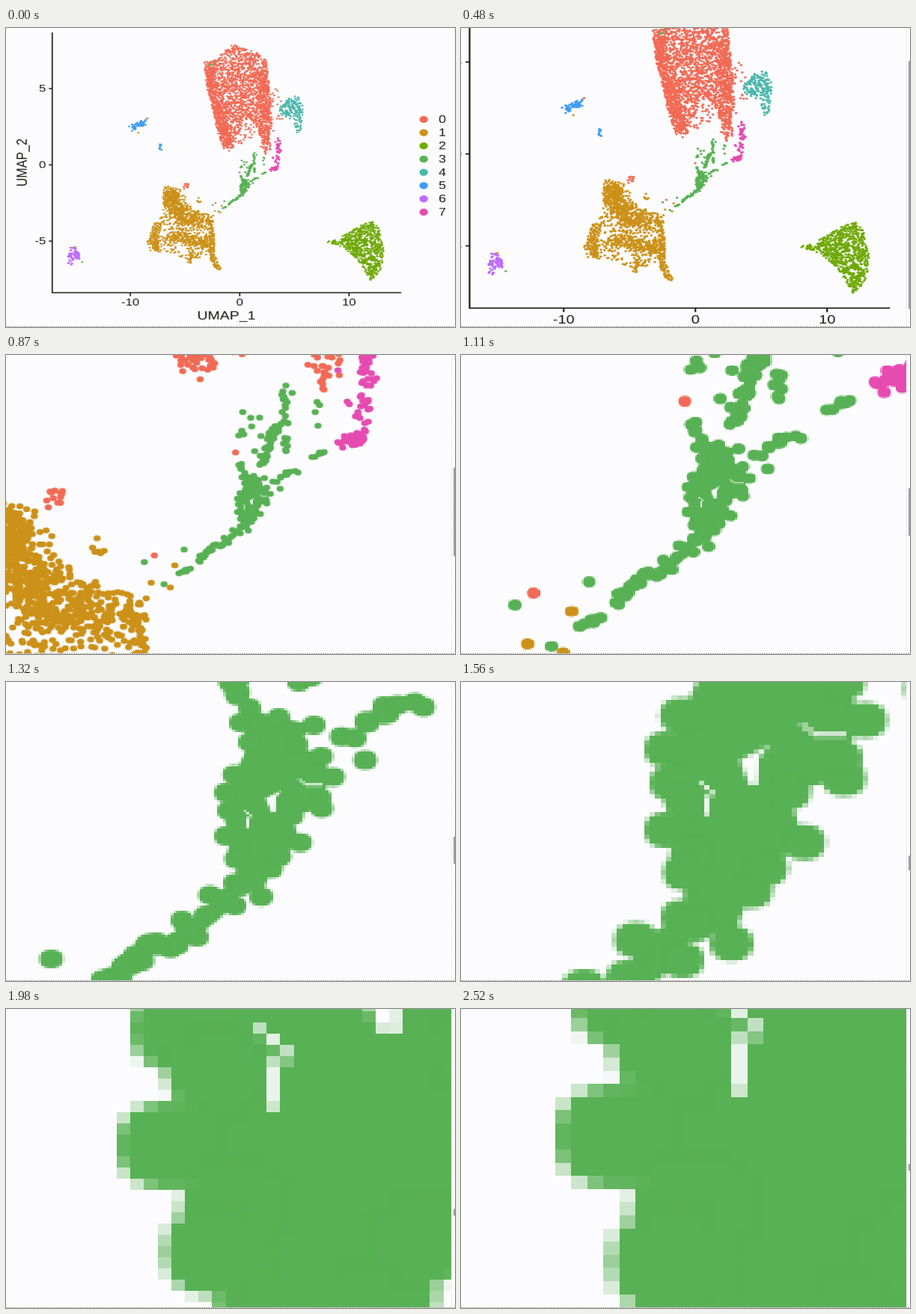
These frames come from a looping animation (600x400 px, 2.76 s). An HTML page with a canvas:

```html
<!DOCTYPE html>
<html lang="en">
<head>
<meta charset="utf-8">
<title>Cluster zoom</title>
<style>
  html, body { margin: 0; width: 100%; height: 100%; overflow: hidden; background: #fcfcfe; }
  canvas { display: block; width: 600px; height: 400px; }
</style>
</head>
<body>
<canvas id="stage" width="600" height="400"></canvas>
<script>
// The plot is a bitmap with slightly wide pixels, shown on a 600 x 400 stage.
const PLOT = { w: 1695, h: 1373 };
const KX = PLOT.w / 600, KY = PLOT.h / 400;
const ANCHOR = { x: 884, y: 744 };
const BACK = '#fcfcfe', INK = '#16160c', FONT = '"Liberation Sans", Arial, sans-serif';
const COLORS = ['#f26a55', '#cc9118', '#6fa908', '#58b154', '#4ab7ac', '#3f9cf2', '#bd6bfc', '#e64bb0'];
const [RED, GOLD, OLIVE, GREEN, TEAL, BLUE, PURPLE, PINK] = COLORS;

const plot = document.createElement('canvas');
plot.width = PLOT.w;
plot.height = PLOT.h;
const pen = plot.getContext('2d');

let seed = 20;
function random() {
  seed = (seed * 1664525 + 1013904223) % 4294967296;
  return seed / 4294967296;
}

const mix = (a, b, k) => a + (b - a) * k;
const clamp = (v, lo, hi) => Math.max(lo, Math.min(hi, v));

function disc(x, y, r, color) {
  pen.fillStyle = color;
  pen.beginPath();
  pen.arc(x, y, r, 0, 7);
  pen.fill();
}

// Two ways to place a dot: in stage units, or in bitmap pixels from the anchor.
const onStage = (color, x, y) => disc(x * KX, y * KY, 4, color);
const nearAnchor = (color, x, y) => disc(ANCHOR.x + x, ANCHOR.y + y, 4, color);

function outline(points, origin = { x: 0, y: 0 }) {
  const path = new Path2D();
  points.forEach(([x, y]) => path.lineTo(origin.x + x, origin.y + y));
  return path;
}

// Random dots inside a polygon.
function fillArea(color, count, points) {
  const path = outline(points);
  const xs = points.map(p => p[0]), ys = points.map(p => p[1]);
  const x0 = Math.min(...xs), x1 = Math.max(...xs);
  const y0 = Math.min(...ys), y1 = Math.max(...ys);
  while (count > 0) {
    const x = mix(x0, x1, random()), y = mix(y0, y1, random());
    if (!pen.isPointInPath(path, x, y)) continue;
    onStage(color, x, y);
    count--;
  }
}

// Random dots strewn along a line, up to `spread` away from it.
function strew(place, color, count, spread, points) {
  for (let i = 0; i < count; i++) {
    const t = (i + random()) / count * (points.length - 1);
    const k = Math.min(Math.floor(t), points.length - 2);
    const [a, b] = [points[k], points[k + 1]];
    const turn = random() * 2 * Math.PI, off = spread * Math.sqrt(random());
    place(color, mix(a[0], b[0], t - k) + off * Math.cos(turn),
      mix(a[1], b[1], t - k) + off * Math.sin(turn));
  }
}

function label(text, x, y, size, align, turn = 0) {
  pen.save();
  pen.translate(x * KX, y * KY);
  pen.rotate(turn);
  pen.font = size + 'px ' + FONT;
  pen.textAlign = align;
  pen.textBaseline = 'middle';
  pen.fillStyle = INK;
  pen.fillText(text, 0, 0);
  pen.restore();
}

function rule(x1, y1, x2, y2) {
  pen.strokeStyle = INK;
  pen.lineWidth = 5;
  pen.beginPath();
  pen.moveTo(x1 * KX, y1 * KY);
  pen.lineTo(x2 * KX, y2 * KY);
  pen.stroke();
}

function drawAxes() {
  rule(62, 6, 62, 354.6);
  rule(61.5, 354, 528, 354);
  [-10, 0, 10].forEach(v => {
    const x = 312.3 + v * 14.6;
    rule(x, 354, x, 358.5);
    label(v, x, 367.5, 47, 'center');
  });
  [5, 0, -5].forEach(v => {
    const y = 183 - v * 20.4;
    rule(57.5, y, 62, y);
    label(v, 53.5, y + 0.6, 47, 'right');
  });
  label('UMAP_1', 294.5, 385.5, 55, 'center');
  label('UMAP_2', 22.5, 180, 55, 'center', -Math.PI / 2);
  COLORS.forEach((color, i) => {
    const y = 122.3 + i * 17.7;
    disc(558 * KX, y * KY, 16, color);
    label(i, 578, y + 0.6, 50, 'left');
  });
}

function drawClusters() {
  const along = (...args) => strew(onStage, ...args);

  fillArea(RED, 1950, [[265, 46], [280, 42], [302, 22], [335, 33], [348, 43], [353, 95], [356, 130],
    [347, 170], [334, 130], [318, 120], [301, 162], [282, 135], [268, 75]]);
  along(RED, 320, 8, [[282, 100], [289, 132], [297, 158]]);
  along(RED, 200, 7, [[345, 60], [346, 110], [347, 160]]);
  along(RED, 150, 6, [[271, 53], [277, 95]]);
  along(RED, 45, 14, [[304, 145], [328, 132]]);
  along(RED, 30, 10, [[357, 85], [362, 118]]);
  along(RED, 14, 5, [[239, 209], [242, 213]]);

  fillArea(GOLD, 520, [[211, 212], [232, 213], [248, 241], [277, 250], [278, 300], [246, 312],
    [220, 302], [190, 297], [188, 284], [207, 258]]);
  along(GOLD, 500, 11, [[220, 219], [222, 235], [236, 251], [266, 259]]);
  along(GOLD, 120, 6, [[204, 259], [195, 283], [203, 294]]);
  along(GOLD, 200, 8, [[218, 281], [236, 279], [256, 287], [272, 286]]);
  along(GOLD, 160, 4, [[273, 254], [275, 284], [275, 305], [284, 322]]);
  along(GOLD, 24, 3, [[249, 298], [246, 313]]);
  along(GOLD, 6, 3, [[255, 228], [260, 235]]);

  fillArea(OLIVE, 780, [[428, 286], [445, 281], [475, 263], [490, 259], [498, 268], [506, 300],
    [500, 325], [488, 339], [470, 310], [450, 293]]);
  fillArea(TEAL, 175, [[364, 108], [378, 91], [390, 91], [397, 105], [394, 138], [386, 141],
    [385, 124], [368, 116]]);
  along(PINK, 80, 3, [[364, 148], [365, 165], [361, 187], [355, 190]]);
  along(PINK, 6, 8, [[356, 140], [356, 175]]);
  along(BLUE, 50, 4, [[167, 134], [177, 129], [187, 126]]);
  along(BLUE, 8, 2.5, [[205, 156], [206, 162]]);
  fillArea(PURPLE, 75, [[83, 293], [92, 293], [100, 303], [99, 309], [91, 309], [90, 317], [83, 316]]);

  onStage(RED, 189, 121);
  onStage(GOLD, 177, 140);
  onStage(GOLD, 93, 293);
  onStage(GREEN, 102, 313);
  along(GREEN, 3, 3, [[272, 48], [277, 47]]);
}

function drawBridge() {
  const along = (...args) => strew(nearAnchor, GREEN, ...args);

  // The crowded middle: a filled ring with one dot on each corner.
  const ring = [[8, -53], [5, -47], [8, -39], [2.8, -25.5], [0, -18], [1, -10.5], [3.6, -6.5], [0, 0],
    [4.7, 5.5], [3.4, 9.5], [3, 19.5], [-5.5, 24.5], [-7, 33], [-15, 35], [-10, 42], [3, 29], [5, 21],
    [12, 25.3], [15.5, 13.5], [18.4, 8.5], [25.3, 2.8], [22.5, -8.5], [32.6, -11.5], [32, -16],
    [36.5, -24.5], [32.5, -33], [24, -38], [30, -46], [18, -49]];
  pen.fillStyle = GREEN;
  pen.fill(outline(ring, ANCHOR));
  ring.forEach(([x, y]) => nearAnchor(GREEN, x, y));

  // Gaps between the crowded dots.
  pen.fillStyle = pen.strokeStyle = BACK;
  pen.fill(outline([[13.5, -15.5], [19, -19], [17, -16], [16.8, -10], [15.4, -10]], ANCHOR));
  pen.lineWidth = 0.9;
  pen.stroke(outline([[6.3, -10.7], [8.4, -8.5], [7.5, -7], [7.5, -3.2]], ANCHOR));
  pen.stroke(outline([[25, -23.7], [27, -21.3], [33, -21.3]], ANCHOR));

  along(5, 2, [[3, -66], [4, -56]]);
  along(50, 5, [[24, -63], [33, -86], [38, -106], [54, -125], [54, -170]]);
  along(7, 4, [[52, -80], [56, -102]]);
  along(10, 4, [[40, -39], [54, -51], [67, -57]]);
  along(6, 3, [[80, -70], [90, -79], [99, -81]]);
  along(24, 3.5, [[-12, 41], [-27, 47], [-35, 56], [-44, 66]]);
  along(6, 2.5, [[-52, 76], [-66, 84]]);
  along(9, 16, [[12, -85], [14, -130]]);
  along(5, 12, [[70, -165], [100, -115]]);
  [[47.5, -31.6], [-59.6, 51], [-104, 68], [-82, 98]].forEach(([x, y]) => nearAnchor(GREEN, x, y));
  [[-2.2, -80.7], [-92.8, 59]].forEach(([x, y]) => nearAnchor(RED, x, y));
  [[-70, 72.5], [-96.4, 96], [-75, 102.5]].forEach(([x, y]) => nearAnchor(GOLD, x, y));
}

pen.fillStyle = BACK;
pen.fillRect(0, 0, PLOT.w, PLOT.h);
drawAxes();
drawClusters();
drawBridge();

const LOOP = 2760, STEP = 30, ZOOM_END = 2220, SCROLL_BACK = 2490;
const KEYS = [
  { t: 0, zoom: 1, x: 312.9, y: 216.8 },
  { t: 240, zoom: 1.03, x: 313.2, y: 215.6 },
  { t: 480, zoom: 1.205, x: 314, y: 209.2 },
  { t: 690, zoom: 2.12, x: 311.8, y: 210 },
  { t: 1110, zoom: 6.3, x: 304, y: 210 },
  { t: 1560, zoom: 20.6, x: 274, y: 198 },
  { t: 1980, zoom: 51.4, x: 220.8, y: 182.5 },
  { t: ZOOM_END, zoom: 60.4, x: 211.6, y: 170.5 }
];

function logSlope(i) {
  const a = KEYS[i - 1], b = KEYS[i + 1];
  return a && b ? Math.log(b.zoom / a.zoom) / (b.t - a.t) : 0;
}

// Zoom follows a smooth curve on a log scale; the anchor drifts in step with it.
function viewAt(time) {
  const t = Math.min(time, ZOOM_END);
  let i = 0;
  while (i < KEYS.length - 2 && t >= KEYS[i + 1].t) i++;
  const a = KEYS[i], b = KEYS[i + 1], span = b.t - a.t;
  const u = (t - a.t) / span, v = 1 - u;
  const zoom = Math.exp(
    (1 + 2 * u) * v * v * Math.log(a.zoom) + u * u * (3 - 2 * u) * Math.log(b.zoom) +
    span * u * v * (v * logSlope(i) - u * logSlope(i + 1)));
  const k = (zoom - a.zoom) / (b.zoom - a.zoom);
  return { zoom, x: mix(a.x, b.x, k), y: mix(a.y, b.y, k) };
}

const ctx = document.getElementById('stage').getContext('2d');

function dotted(x1, y1, x2, y2, color) {
  ctx.strokeStyle = color;
  ctx.lineWidth = 1;
  ctx.setLineDash([2, 1]);
  ctx.beginPath();
  ctx.moveTo(x1, y1);
  ctx.lineTo(x2, y2);
  ctx.stroke();
}

function drawScrollThumb(time, zoom) {
  const length = Math.max(9, 400 / zoom);
  const centre = time < SCROLL_BACK ? 210 + 62 * clamp((time - 1110) / 870, 0, 1) : 212;
  ctx.fillStyle = '#a0a0a0';
  ctx.fillRect(598, centre - length / 2, 2, length);
}

function render(time) {
  const view = viewAt(time), zoomed = view.zoom > 1.05;
  const sx = view.zoom / KX, sy = view.zoom / KY;
  ctx.fillStyle = BACK;
  ctx.fillRect(0, 0, 600, 400);
  ctx.save();
  ctx.beginPath();
  ctx.rect(0, 0, zoomed ? 595 : 600, 399);
  ctx.clip();
  ctx.imageSmoothingEnabled = view.zoom < 3.5;
  ctx.imageSmoothingQuality = 'high';
  ctx.drawImage(plot, view.x - ANCHOR.x * sx, view.y - ANCHOR.y * sy, PLOT.w * sx, PLOT.h * sy);
  ctx.restore();
  dotted(0, 399.5, 600, 399.5, '#a8a8a8');
  if (!zoomed) return;
  dotted(595.5, 0, 595.5, 399, '#e6e6e6');
  drawScrollThumb(time, view.zoom);
}

function tick(now) {
  render(Math.floor(now % LOOP / STEP) * STEP);
  requestAnimationFrame(tick);
}
render(0);
requestAnimationFrame(tick);
</script>
</body>
</html>
```
